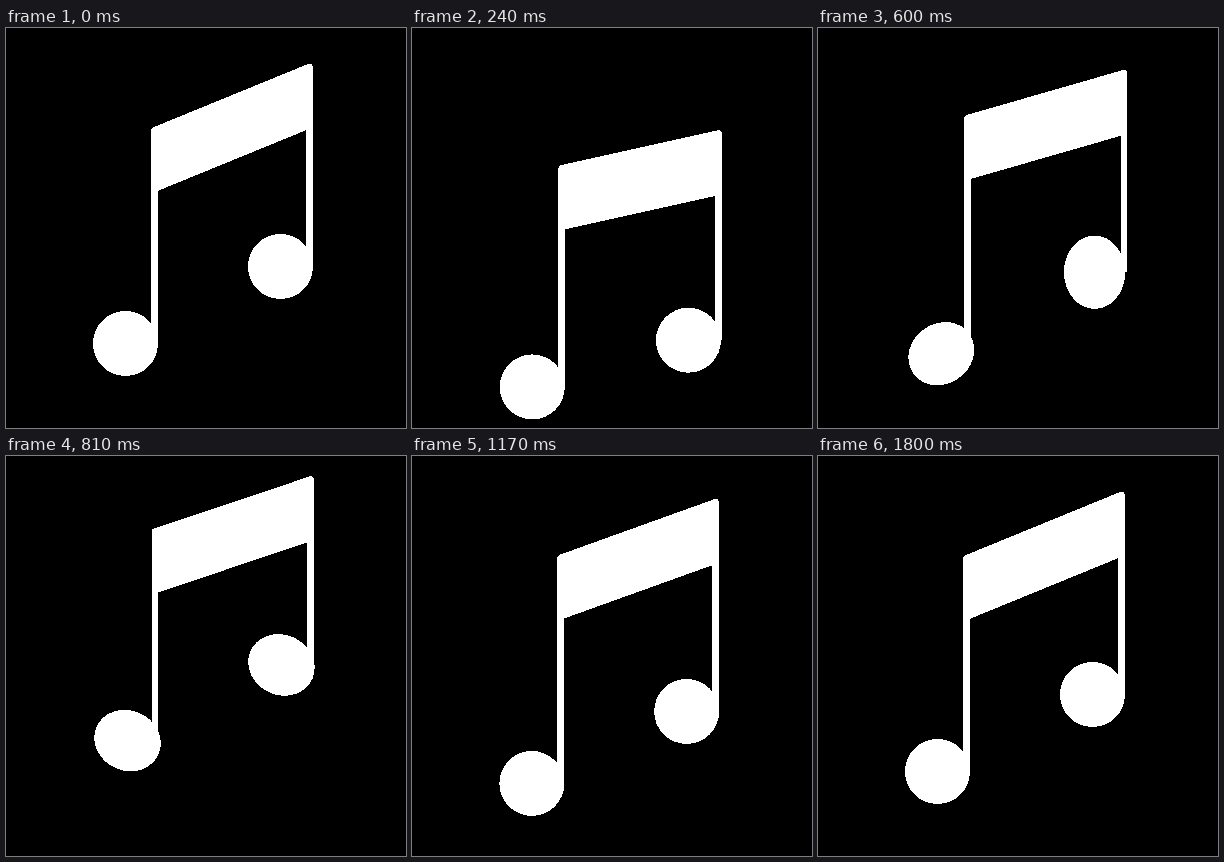
Write an HTML page that moves like this. It is 400x400 px and loops after 1830 ms.

```html
<!DOCTYPE html>
<html lang="en">
<head>
<meta charset="utf-8">
<title>Bouncing note</title>
<style>
  html, body { margin: 0; width: 100%; height: 100%; overflow: hidden; background: #000; }
  svg { display: block; width: 100%; height: 100%; shape-rendering: crispEdges; }
  path { fill: #fff; stroke: #fff; stroke-width: 6.5; stroke-linejoin: round; }
  .stem { fill: none; }
  circle { fill: #fff; }
</style>
</head>
<body>
<svg viewBox="0 0 400 400">
  <path id="beam"/>
  <path id="stems" class="stem"/>
  <circle id="left" r="32.5"/>
  <circle id="right" r="32.5"/>
</svg>
<script>
const LOOP = 1830, STEP = 30, BEAM = 58.4;

// The bounce: times where it turns, and how late each swing gathers speed
const TURNS = [0, 300, 700, 1110, 1420, 1620];
const BIAS = [1, 1.65, 0.8, 1, 1];

// Rest place, sideways sway, delay, and the height of each swing (down is positive)
const PARTS = {
  beamLeft:  { x: 148.5, y: 102.3, sway: 1.5, lag: 0,  swings: [42, -36.8, 0.5, -9.5] },
  beamRight: { x: 303.5, y: 38.9,  sway: 3.8, lag: 0,  swings: [73.6, -24.4, 9, -10.3] },
  headLeft:  { x: 119.5, y: 315.5, sway: 4.2, lag: 70, swings: [48, -33.6, 12, -6.9] },
  headRight: { x: 274.5, y: 238.5, sway: 3,   lag: 20, swings: [81.5, -41.7, 18, -7.5] }
};

const $ = id => document.getElementById(id);
const beam = $("beam"), stems = $("stems"), left = $("left"), right = $("right");

const ease = u => (1 - Math.cos(Math.PI * u)) / 2;
const bump = (t, peak) => Math.exp(-(((t - peak) / 110) ** 2));

// Quick rise to 1 at 360 ms, then a slow fade
function pulse(t) {
  const u = Math.max(t, 0) / 360;
  return (u * Math.exp(1 - u)) ** 3;
}

function bounce(t, { lag, swings }) {
  const times = TURNS.map((turn, i) => i > 1 ? turn + lag : turn);
  const heights = [0, ...swings, 0];
  const i = times.findIndex(turn => turn > t) - 1;
  if (i < 0) return 0;
  const u = (t - times[i]) / (times[i + 1] - times[i]);
  return heights[i] + (heights[i + 1] - heights[i]) * ease(u ** BIAS[i]);
}

function place(t, part) {
  return {
    x: part.x + part.sway * pulse(t - 2 * part.lag),
    y: part.y + bounce(t, part)
  };
}

// Heads deform on the way up, then flatten at the top
function placeHead(head, { x, y }, t, stretch, tilt) {
  const rise = bump(t, 600), top = bump(t, 810);
  const tall = stretch * rise - 0.055 * top;
  const shear = tilt * rise + 0.047 * top;
  head.setAttribute("transform",
    `matrix(${1 - 0.43 * tall} ${shear} ${shear} ${1 + tall} ${x} ${y})`);
}

function draw(t) {
  const a = place(t, PARTS.beamLeft), b = place(t, PARTS.beamRight);
  const l = place(t, PARTS.headLeft), r = place(t, PARTS.headRight);
  beam.setAttribute("d", `M${a.x} ${a.y}L${b.x} ${b.y}v${BEAM}L${a.x} ${a.y + BEAM}Z`);
  stems.setAttribute("d", `M${a.x} ${a.y + BEAM}V${l.y}M${b.x} ${b.y + BEAM}V${r.y}`);
  placeHead(left, l, t, -0.027, -0.064);
  placeHead(right, r, t, 0.13, 0);
}

const start = performance.now();
function tick() {
  const t = (performance.now() - start) % LOOP;
  draw(Math.floor(t / STEP) * STEP);
  requestAnimationFrame(tick);
}
tick();
</script>
</body>
</html>
```
